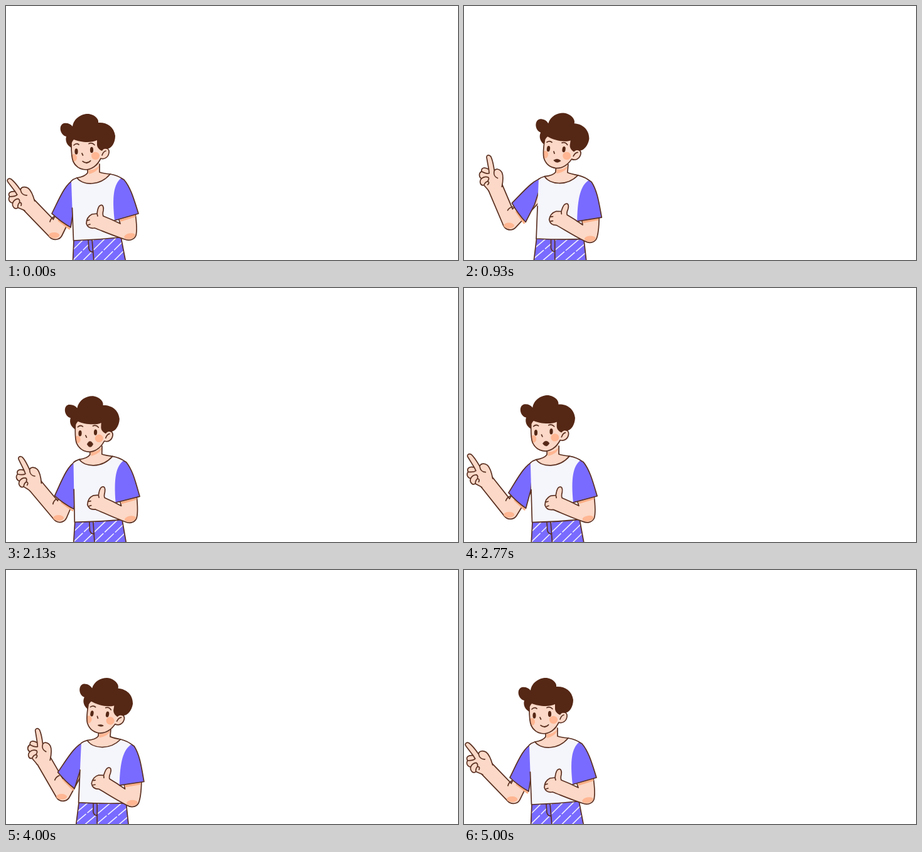
These frames come from a looping animation (720x405 px, 5030 ms). An HTML page:

```html
<!DOCTYPE html>
<html lang="en">
<head>
<meta charset="utf-8">
<title>Presenter</title>
<style>
  html, body { margin: 0; width: 100%; height: 100%; overflow: hidden; background: #fff; }
  svg { display: block; width: 720px; height: 405px; }
  path, line, ellipse { stroke-linecap: round; stroke-linejoin: round; }
  .ink { fill: none; stroke: #5b3122; stroke-width: 1.7; }
  .skin { fill: #fbd8c7; }
  .blue { fill: #796bff; }
  .white { fill: #f5f5fc; }
  .hair { fill: #552715; }
  .glow { fill: #ffb692; }
  .shade { fill: none; stroke: #fcae84; stroke-width: 3; }
  #stripes { stroke: #f1f0ff; stroke-width: 1.6; stroke-dasharray: 26 4; }
  #armInk, #armSkin { fill: none; stroke-linecap: butt; }
  #armInk { stroke: #5b3122; stroke-width: 25.5; }
  #armSkin { stroke: #fbd8c7; stroke-width: 22; }
</style>
</head>
<body>
<svg viewBox="0 0 720 405">
  <defs>
    <clipPath id="pantsClip"><path d="M108 370 L106 420 H193 L183 366Z"/></clipPath>
    <clipPath id="faceClip"><path d="M104 212 C104 225 103 240 107 248 C112 258 120 261 128 261 L155 240 V212Z"/></clipPath>
  </defs>

  <!-- pointing arm -->
  <path id="armInk"/>
  <path id="armSkin"/>
  <ellipse id="elbow" class="glow" rx="8.5" ry="4.5"/>
  <g id="hand">
    <path class="skin" d="M11 6 C16 -4 18 -10 17 -16 C15 -23 9 -25 6 -22 C7 -30 7.5 -40 6.5 -45 C4.5 -50 -.5 -49 -.5 -44 L-2 -26 C-7 -32 -13 -32 -14 -26 C-20 -24 -20 -18 -17 -15 C-22 -12 -22 -4 -16 -4 C-14 1 -12 3 -11 7Z"/>
    <path class="ink" d="M11 6 C16 -4 18 -10 17 -16 C15 -23 9 -25 6 -22 C7 -30 7.5 -40 6.5 -45 C4.5 -50 -.5 -49 -.5 -44 L-2 -26 C-7 -32 -13 -32 -14 -26 C-20 -24 -20 -18 -17 -15 C-22 -12 -22 -4 -16 -4 C-14 1 -12 3 -11 7 M-14 -26 C-10 -22 -7 -20 -3 -20 M-2 -26 L-3 -20 M-17 -15 Q-11 -18 -6 -14 Q-5 -11 -8 -9 M-16 -4 Q-12 -9 -8 -8 Q-6 -5 -10 -3 M6 -22 C3 -17 4 -12 8 -9"/>
  </g>
  <g id="sleeve">
    <path class="shade" d="M84 342 L101 355"/>
    <path class="ink" d="M76 336 Q71 339 70 344"/>
    <path class="ink" style="fill:#796bff" d="M108 277 C94 284 85 307 73 331 Q87 344 103 353 L108 322Z"/>
  </g>

  <g id="body">
    <g clip-path="url(#pantsClip)">
      <path class="blue" d="M100 360 H200 V420 H100Z"/>
      <g id="stripes"></g>
      <path class="blue" d="M131 372 L132 388 Q134 394 140 392 L137 371Z"/>
    </g>
    <path class="ink" d="M108 373 L106 420 M183 368 L193 420 M131 373 L132 387 Q134 393 139 392 M137 372 L141 420"/>

    <path class="white" d="M113 274 Q106 276 104 280 L105.500 322 L107.500 374 Q145 373 181 369 L190 290 L184 274 L166 268 Q140 292 113 274Z"/>
    <path class="ink" d="M105.500 322 L107.500 374 Q145 373 181 369 M113 274 Q107 276 104 279 M166 268 Q178 270 186 276"/>
    <path class="skin" d="M130 256 V266 Q126 272 113 274 C122 286 149 288 166 268 Q155 267 149 265 V250Z"/>
    <path class="glow" d="M131 261 Q140 263 149 254 Q147 264 132 268Z"/>
    <path class="ink" d="M130 260 V266 Q126 272 113 274 C122 286 149 288 166 268 Q155 267 149 265 V252"/>

    <g id="rightArm">
      <g id="thumbArm">
        <path class="skin" d="M180 335 L206 331 C208 345 209 358 207 366 C204 373 196 375 189 372 C170 366 152 358 141 354 C135 355 130 353 128 347 C128 340 131 335 137 332 L145 331 C146 326 146 320 150 318 C154 316 156 320 155 326 C154 330 154 333 155 335 Q168 340 182 347Z"/>
        <ellipse class="glow" cx="197" cy="367" rx="9" ry="4.5" transform="rotate(-12 197 367)"/>
        <path class="ink" d="M206 331 C208 345 209 358 207 366 C204 373 196 375 189 372 C170 366 152 358 141 354 C135 355 130 353 128 347 C128 340 131 335 137 332 L145 331 C146 326 146 320 150 318 C154 316 156 320 155 326 C154 330 154 333 155 335 Q168 340 182 347 L180 341 M145 331 L146 335 M130 342 L133 341 M131 349 L134 348"/>
      </g>
      <path class="shade" d="M183 342 L205 335"/>
      <path class="blue" d="M184 274 C171 284 169 305 173 342 L211 331 C204 309 199 290 188 277Z"/>
      <path class="ink" d="M173 342 L211 331 C204 309 199 290 188 277 L184 275"/>
    </g>

    <g id="head">
      <path class="skin" d="M151 243 C157 245 163 241 164 234 C165 227 158 224 153 229Z"/>
      <path class="skin" d="M104 212 C104 225 103 240 107 248 C112 258 120 261 128 261 C138 260 146 253 151 243 L156 212Z"/>
      <g clip-path="url(#faceClip)"><ellipse class="glow" cx="108" cy="242" rx="5" ry="6"/></g>
      <ellipse class="glow" cx="142.5" cy="239" rx="6.5" ry="6.2"/>
      <path class="ink" d="M104 220 C104 230 104 241 107 248 C112 258 120 261 128 261 C138 260 146 253 151 243 C157 245 163 241 164 234 C165 227 158 224 153 229 M153 238 Q155 232 159 231"/>
      <path class="hair" d="M104 226 C97 222 94 215 96 208 C86 206 83 190 92 187 C98 186 103 188 106 192 C108 178 122 171 132 172 C143 174 148 181 147 186 C160 185 172 192 174 207 C174 218 168 228 160 228 C157 227 155 228 153 231 C148 229 145 225 145 221 L145 214 C135 219 118 217 108 213 C105 216 104 220 104 226Z"/>
      <path class="ink" d="M108 222 Q112 218 116 221 M132 219.5 Q137 217 141 221.5 M121 235 L122.5 238"/>
      <ellipse class="hair" cx="112" cy="232" rx="2.6" ry="4.7"/>
      <ellipse class="hair" cx="136.5" cy="229.5" rx="2.6" ry="4.7"/>
      <path id="mouth" class="ink" style="fill:#552715" transform="translate(128.5 248.7) rotate(-4)"/>
    </g>
  </g>
</svg>

<script>
  const LOOP = 5030, CYCLE = 2500, RAD = Math.PI / 180;
  const UPPER = 78.5, FORE = 65;
  const HIP = [150, 470], SHOULDER = [113, 290];

  // time, then tilt of upper arm, forearm and hand
  const armKeys = [
    [0, 26, 44, 42],
    [830, 44, 23.5, 18],
    [930, 43, 23, 15],
    [1500, 28.5, 30, 14],
    [1600, 25.3, 32, 16],
    [2130, 23, 40, 31]
  ];

  // time, then half width, corner height, upper and lower bend
  const mouthKeys = [
    [0, 6.3, -1.5, 4, 4.6],
    [930, 5, 0, -4, 4.5],
    [1600, 4.2, 0, -6, 6],
    [2130, 4.2, 0, -8, 8],
    [3330, 5, 0, -5, 6.5],
    [4000, 3.8, 0, -1.8, 2],
    [5000, 6.3, -1.5, 4, 4.6]
  ];

  const $ = id => document.getElementById(id);
  const set = (id, name, value) => $(id).setAttribute(name, value);

  for (let x = 69; x < 200; x += 16.5) {
    const line = document.createElementNS("http://www.w3.org/2000/svg", "path");
    line.setAttribute("d", `M${x} 410 l45 -45`);
    $("stripes").append(line);
  }

  // Smooth periodic curve through the arm keys
  function armAt(time) {
    const n = armKeys.length;
    const key = i => {
      const [t, ...v] = armKeys[(i + n) % n];
      return { t: t + Math.floor(i / n) * CYCLE, v };
    };
    let i = n - 1;
    while (armKeys[i][0] > time) i--;
    const [a, b, c, d] = [i - 1, i, i + 1, i + 2].map(key);
    const span = c.t - b.t, u = (time - b.t) / span;
    return b.v.map((p, k) => {
      const q = c.v[k];
      const m = (q - a.v[k]) / (c.t - a.t) * span;
      const w = (d.v[k] - p) / (d.t - b.t) * span;
      return p + u * (m + u * (3 * (q - p) - 2 * m - w + u * (2 * (p - q) + m + w)));
    });
  }

  function mouthAt(time) {
    const i = Math.max(1, mouthKeys.findIndex(k => k[0] >= time));
    const a = mouthKeys[i - 1], b = mouthKeys[i];
    const u = (time - a[0]) / (b[0] - a[0]);
    return a.slice(1).map((v, k) => v + (b[k + 1] - v) * u);
  }

  function turn([x, y], [cx, cy], deg) {
    const s = Math.sin(deg * RAD), c = Math.cos(deg * RAD);
    return [cx + (x - cx) * c - (y - cy) * s, cy + (x - cx) * s + (y - cy) * c];
  }

  function draw(time) {
    const t = Math.min(time % LOOP, 5000);
    const local = t % CYCLE;
    const phase = local / CYCLE * 2 * Math.PI;
    const sway = (1 - Math.cos(phase)) / 2;
    const swing = Math.sin(phase);
    const lean = 5.25 * sway;

    set("body", "transform", `rotate(${lean} ${HIP})`);
    set("head", "transform",
      `translate(${2.4 * sway - 0.8 * swing} ${0.1 * sway - swing}) rotate(${4.4 * sway} 140 266)`);
    set("rightArm", "transform", `rotate(${3.2 * sway} 186 285)`);
    set("thumbArm", "transform", `rotate(${2 * sway} 196 362)`);

    const [upper, fore, hand] = armAt(local);
    const s = turn(SHOULDER, HIP, lean);
    const e = [s[0] - UPPER * Math.sin(upper * RAD), s[1] + UPPER * Math.cos(upper * RAD)];
    const w = [e[0] - FORE * Math.sin(fore * RAD), e[1] - FORE * Math.cos(fore * RAD)];
    const arm = `M${s} L${e} L${w}`;
    set("armInk", "d", arm);
    set("armSkin", "d", arm);
    set("elbow", "transform", `translate(${e[0] - 2} ${e[1] + 5})`);
    set("hand", "transform", `translate(${w}) rotate(${-hand})`);

    // The sleeve trails the arm on the way back
    const trail = 4 * sway * (1 - swing);
    set("sleeve", "transform",
      `translate(${s}) rotate(${upper - 26 + trail}) translate(${-SHOULDER[0]} ${-SHOULDER[1]})`);

    const [half, corner, top, low] = mouthAt(t);
    set("mouth", "d", `M${-half} ${corner} Q0 ${top} ${half} ${corner} Q0 ${low} ${-half} ${corner}Z`);
  }

  const start = performance.now();
  function tick() {
    draw(performance.now() - start);
    requestAnimationFrame(tick);
  }
  tick();
</script>
</body>
</html>
```
